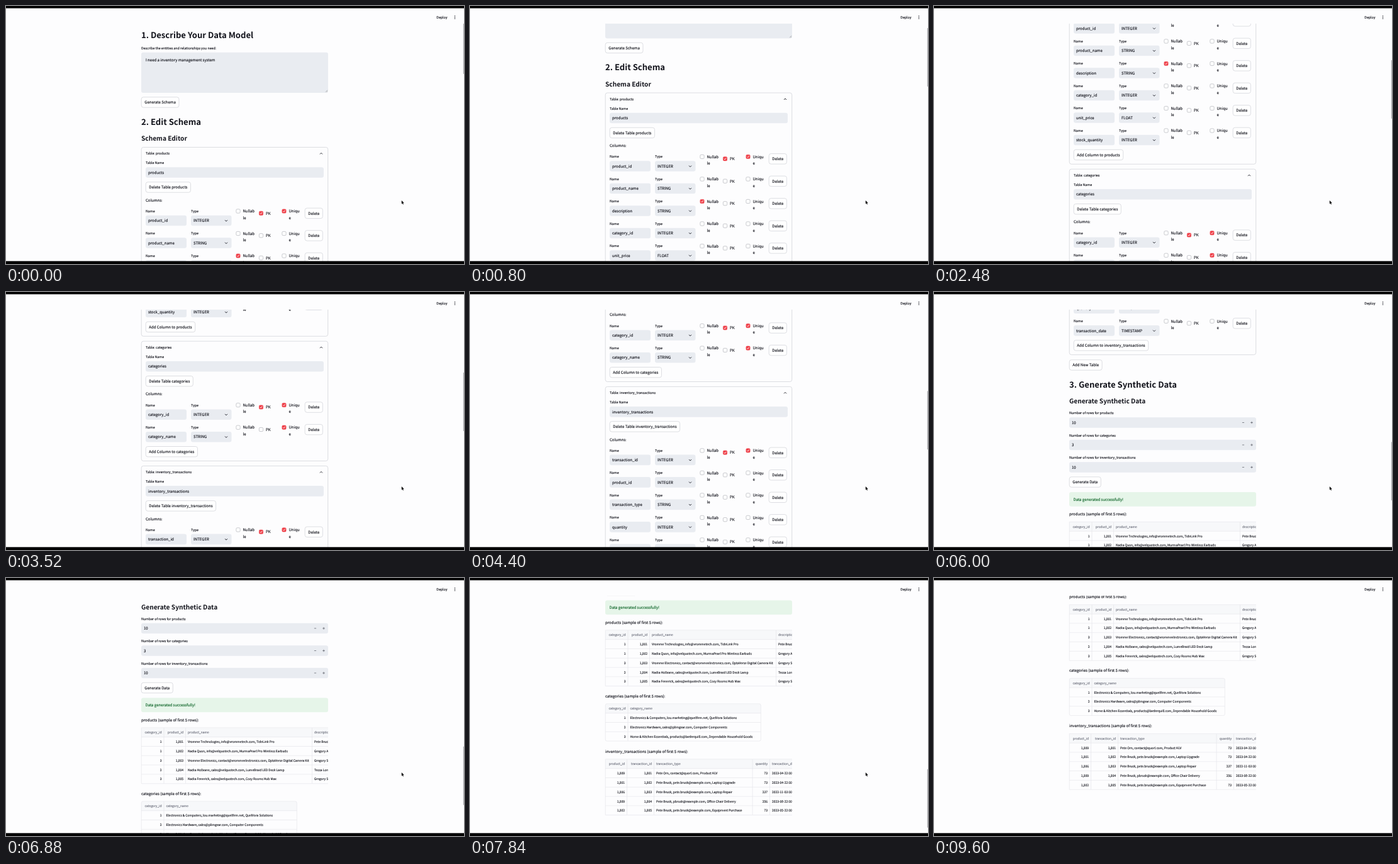
Recreate the animation shown at these times as an HTML page with a canvas. Size 728x410 px, loop 9.76 s.

```html
<!DOCTYPE html>
<html lang="en">
<head>
<meta charset="utf-8">
<title>Schema editor walkthrough</title>
<style>
html, body { margin: 0; width: 100%; height: 100%; overflow: hidden; background: #fdfdfe; }
canvas { display: block; width: 728px; height: 410px; }
</style>
</head>
<body>
<canvas id="stage"></canvas>
<script>
const W = 728, H = 410, LOOP = 9760, STEP = 80;
const canvas = document.getElementById('stage');
const ctx = canvas.getContext('2d');
const dpr = window.devicePixelRatio || 1;
canvas.width = W * dpr;
canvas.height = H * dpr;

const FONT = '"Noto Sans CJK JP", "Noto Sans CJK SC", "Noto Sans CJK", "Noto Sans", sans-serif';
const GLYPH = 0.895; // the CJK family draws its Latin letters large for the em
const BODY = 6.75, SMALL = 5.9, CELL = 5.48, H2 = 14.62, H3 = 11.36;
const INK = '#14151d', FIELD = '#e9ecf1', EDGE = '#c6c8ce', GRID = '#e2e3e8', RED = '#ee414a';
const LEFT = 215, RIGHT = 512;

// Scroll flicks: start ms, steps, distance
const flicks = [
  [0, 4, 15], [480, 8, 102.28], [1200, 13, 141.31], [2240, 13, 180], [3280, 12, 163.95],
  [4320, 13, 201.58], [5360, 13, 185], [6480, 13, 189.35], [7520, 9, 103.53], [8320, 4, 1]
];
const glide = u => 1 - Math.pow(1 - Math.pow(u, 1.6), 3);
const scrollAt = t => flicks.reduce((sum, [start, steps, dist]) =>
  sum + dist * glide(Math.min(1, Math.max(0, (t - start) / (steps * STEP)))), 0);

const schema = [
  ['products', ['product_id INTEGER PU', 'product_name STRING', 'description STRING N',
    'category_id INTEGER', 'unit_price FLOAT', 'stock_quantity INTEGER']],
  ['categories', ['category_id INTEGER PU', 'category_name STRING U']],
  ['inventory_transactions', ['transaction_id INTEGER PU', 'product_id INTEGER',
    'transaction_type STRING', 'quantity INTEGER', 'transaction_date TIMESTAMP']]
];

// Column: left edge, heading, numeric flag
const samples = [
  { name: 'products', y: 1313, right: RIGHT,
    cols: [[215, 'category_id', 1], [251, 'product_id', 1], [285.5, 'product_name'], [486.5, 'description']],
    rows: [
      ['1', '1,001', 'Vromme Technologies, info@vrommetech.com, TideLink Pro', 'Pete Brusk'],
      ['1', '1,002', 'Nadia Quon, info@velquotech.com, MurmaPearl Pro Wireless Earbuds', 'Gregory Aln'],
      ['3', '1,003', 'Vromme Electronics, contact@vrommeelectronics.com, OptaVerse Digital Camera Kit', 'Gregory Sol'],
      ['2', '1,004', 'Nadia Hollvane, sales@velquotech.com, LumeBraid LED Desk Lamp', 'Tessa Lorn'],
      ['3', '1,005', 'Nadia Fennrick, sales@velquotech.com, Cosy Rooms Hub Max', 'Gregory Sol']
    ] },
  { name: 'categories', y: 1430, right: 462.5, closed: true,
    cols: [[215, 'category_id', 1], [251, 'category_name']],
    rows: [
      ['1', 'Electronics & Computers, lou.marketing@quelfirm.net, QuelVora Solutions'],
      ['2', 'Electronics Hardware, sales@plimgear.com, Computer Components'],
      ['3', 'Home & Kitchen Essentials, products@larderquill.com, Dependable Household Goods']
    ] },
  { name: 'inventory_transactions', y: 1518, right: RIGHT,
    cols: [[215, 'product_id', 1], [249.5, 'transaction_id', 1], [292.5, 'transaction_type'],
      [449, 'quantity', 1], [476.5, 'transaction_date']],
    rows: [
      ['1,009', '1,001', 'Pete Orn, contact@quorl.com, Product KLV', '73', '2023-04-22 00:00'],
      ['1,001', '1,002', 'Pete Brusk, pete.brusk@example.com, Laptop Upgrade', '73', '2023-04-22 00:00'],
      ['1,006', '1,003', 'Pete Brusk, pete.brusk@example.com, Laptop Repair', '237', '2022-11-03 00:00'],
      ['1,009', '1,004', 'Pete Brusk, pbrusk@example.com, Office Chair Delivery', '256', '2023-08-22 00:00'],
      ['1,002', '1,005', 'Pete Brusk, pete.brusk@example.com, Equipment Purchase', '73', '2023-05-22 00:00']
    ] }
];

function setFont(size, weight = 400) {
  ctx.font = `${weight} ${(size * GLYPH).toFixed(3)}px ${FONT}`;
}

// Text centred vertically on y; regular weight gets a hairline so small type stays dark
function text(str, x, y, size = BODY, color = INK, align = 'left', weight = 400) {
  setFont(size, weight);
  ctx.fillStyle = ctx.strokeStyle = color;
  ctx.textAlign = align;
  ctx.fillText(str, x, y + size * 0.33);
  if (weight === 400) {
    ctx.lineWidth = 0.14;
    ctx.strokeText(str, x, y + size * 0.33);
  }
}
const heading = (str, y, size) => text(str, LEFT, y, size, INK, 'left', 700);

function box(x, y, w, h, r, fill, stroke, width = 0.6) {
  ctx.beginPath();
  ctx.roundRect(x, y, w, h, r);
  if (fill) { ctx.fillStyle = fill; ctx.fill(); }
  if (stroke) { ctx.strokeStyle = stroke; ctx.lineWidth = width; ctx.stroke(); }
}

function line(points, color, width) {
  ctx.beginPath();
  points.forEach(([x, y]) => ctx.lineTo(x, y));
  ctx.strokeStyle = color;
  ctx.lineWidth = width;
  ctx.stroke();
}

const field = (x, y, w) => box(x, y - 8.3, w, 16.6, 3.2, FIELD);

function button(label, x, y) {
  setFont(BODY);
  const w = ctx.measureText(label).width + 10.6;
  box(x + 0.2, y - 8.2, w - 0.4, 16.4, 3.2, '#fff', EDGE);
  text(label, x + 5.3, y);
}

// dir 1 points down, -1 points up
function chevron(x, y, dir) {
  line([[x - 2, y - dir], [x, y + dir], [x + 2, y - dir]], INK, 0.9);
}

function checkbox(x, y, on) {
  box(x - 3.1, y - 3.1, 6.2, 6.2, 1.5, on ? RED : '#fff', on ? RED : '#a4a6ae', 0.6);
  if (on) line([[x - 1.6, y], [x - 0.4, y + 1.3], [x + 1.7, y - 1.4]], '#fff', 0.9);
}

function columnRow(spec, y) {
  const [name, type, flags = ''] = spec.split(' ');
  text('Name', 222, y, SMALL);
  field(222, y + 15, 65);
  text(name, 226, y + 15);
  text('Type', 294, y, SMALL);
  field(294, y + 15, 64.5);
  text(type, 298, y + 15);
  chevron(350, y + 15.2, 1);
  checkbox(369, y, flags.includes('N'));
  text('Nullab', 376.5, y);
  text('le', 376.5, y + 10.5);
  checkbox(405.5, y + 3.3, flags.includes('P'));
  text('PK', 413, y + 3.3);
  checkbox(442, y, flags.includes('U'));
  text('Uniqu', 449.5, y);
  text('e', 449.5, y + 10.5);
  button('Delete', 475, y + 3.4);
}

// Draws one expander and returns where the next one's header sits
function tableEditor([name, columns], y) {
  const rows = y + 91.5, add = rows + 35.5 * columns.length + 3;
  box(LEFT + 0.2, y - 10, RIGHT - LEFT - 0.5, add + 24.8 - y, 3.2, null, EDGE);
  text('Table: ' + name, 222, y, SMALL);
  chevron(501, y, -1);
  text('Table Name', 222, y + 15, SMALL);
  field(222, y + 30, 283);
  text(name, 226, y + 30);
  button('Delete Table ' + name, 222, y + 53.5);
  text('Columns:', 222, y + 74);
  columns.forEach((c, i) => columnRow(c, rows + 35.5 * i));
  button('Add Column to ' + name, 222, add);
  return add + 32.7;
}

function numberInput(name, value, y) {
  const mark = '#3c3e49';
  text('Number of rows for ' + name, LEFT, y, SMALL);
  field(LEFT, y + 15, RIGHT - LEFT);
  text(value, 219, y + 15);
  line([[489.9, y + 15], [493.1, y + 15]], mark, 0.6);
  line([[503.2, y + 15], [506.8, y + 15]], mark, 0.6);
  line([[505, y + 13.2], [505, y + 16.8]], mark, 0.6);
}

function sampleTable({ name, y, right, closed, cols, rows }) {
  const pitch = 14.8, top = y + 12.4, bottom = top + pitch * (rows.length + 1);
  text(name + ' (sample of first 5 rows):', LEFT, y);
  ctx.save();
  ctx.beginPath();
  ctx.roundRect(LEFT, top, right - LEFT, bottom - top, closed ? 2.5 : [2.5, 0, 0, 2.5]);
  ctx.clip();
  ctx.fillStyle = '#f7f8fa';
  ctx.fillRect(LEFT, top, right - LEFT, pitch);
  cols.forEach(([x, title, numeric], c) => {
    const end = c + 1 < cols.length ? cols[c + 1][0] : right;
    const at = numeric ? end - 3.5 : x + 3.5;
    const align = numeric ? 'right' : 'left';
    text(title, at, top + pitch / 2 + 0.2, CELL, '#6c6f7c', align);
    rows.forEach((row, r) =>
      text(row[c], at, top + pitch * (r + 1.5) + 0.2, CELL, INK, align));
    if (c) line([[x, top], [x, bottom]], GRID, 0.6);
  });
  rows.forEach((_, r) => {
    const ry = top + pitch * (r + 1);
    line([[LEFT, ry], [right, ry]], GRID, 0.6);
  });
  ctx.restore();
  if (closed) {
    box(LEFT + 0.2, top, right - LEFT - 0.4, bottom - top, 2.5, null, GRID);
  } else {
    line([[right, top], [LEFT + 0.2, top], [LEFT + 0.2, bottom], [right, bottom]], GRID, 0.6);
  }
}

function page() {
  heading('1. Describe Your Data Model', 46, H2);
  text('Describe the entities and relationships you need:', LEFT, 67, SMALL);
  box(LEFT, 73.7, RIGHT - LEFT, 64.3, 3.2, FIELD);
  text('I need a inventory management system', 222, 85.5);
  line([[508, 136.7], [511, 133.7]], '#777', 0.5);
  line([[509.7, 136.7], [511, 135.4]], '#777', 0.5);
  button('Generate Schema', LEFT, 153);
  heading('2. Edit Schema', 184, H2);
  heading('Schema Editor', 210.5, H3);
  schema.reduce((y, table) => tableEditor(table, y), 234.5);
  button('Add New Table', LEFT, 1076);
  heading('3. Generate Synthetic Data', 1107.5, H2);
  heading('Generate Synthetic Data', 1133.5, H3);
  ['10', '3', '10'].forEach((n, i) => numberInput(schema[i][0], n, 1152.5 + 35.5 * i));
  button('Generate Data', LEFT, 1262);
  box(LEFT, 1278, RIGHT - LEFT, 22.7, 3.2, '#e6f5e9');
  text('Data generated successfully!', 221.5, 1289.3, BODY, '#0d6427');
  samples.forEach(sampleTable);
}

function pointer(x, y) {
  ctx.beginPath();
  [[0, 0], [0, 5.6], [1.3, 4.5], [2.2, 6.5], [3.1, 6.1], [2.2, 4.2], [3.9, 4.1]]
    .forEach(([dx, dy]) => ctx.lineTo(x + dx, y + dy));
  ctx.closePath();
  ctx.strokeStyle = '#fff';
  ctx.lineWidth = 0.8;
  ctx.stroke();
  ctx.fillStyle = '#000';
  ctx.fill();
}

function scrollbar(scroll, alpha) {
  const top = 15 + scroll * 0.2325;
  const from = Math.max(28, top);
  ctx.globalAlpha = alpha;
  box(726.8, from, 2.5, top + 93 - from, 0.7, '#aeaeb2');
  ctx.globalAlpha = 1;
}

function draw(t) {
  const scroll = scrollAt(t);
  ctx.setTransform(dpr, 0, 0, dpr, 0, 0);
  ctx.textRendering = 'geometricPrecision';
  ctx.textBaseline = 'alphabetic';
  ctx.lineJoin = 'round';
  ctx.fillStyle = '#fdfdfe';
  ctx.fillRect(0, 0, W, H);

  ctx.save();
  ctx.beginPath();
  ctx.rect(0, 28, W, 378);
  ctx.clip();
  ctx.translate(0, -Math.round(scroll * 2) / 2);
  page();
  ctx.restore();

  text('Deploy', 684.3, 18, SMALL);
  for (const y of [15.6, 17.8, 20]) box(712.8, y - 0.7, 1.4, 1.4, 0.7, INK);
  if (t < 8960) scrollbar(scroll, t < 8880 ? 1 : 0.5);
  if (t < 8880) pointer(628.8, 309);

  ctx.fillStyle = '#000';
  ctx.fillRect(0, 0, W, 3.6);
  ctx.fillRect(0, 405.4, W, 4.6);
}

const began = performance.now();
let shown = -1;
function tick() {
  const t = Math.floor(((performance.now() - began) % LOOP) / STEP) * STEP;
  if (t !== shown) draw(shown = t);
  requestAnimationFrame(tick);
}
tick();
</script>
</body>
</html>
```
